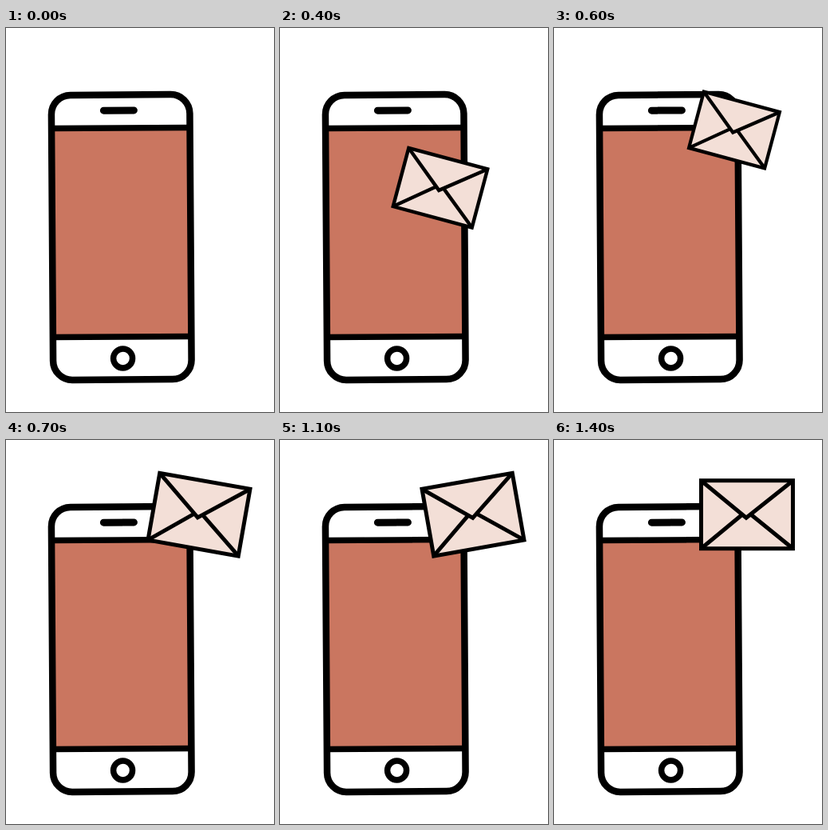
Animation, 336 px wide and 480 px high, one loop 1.5 s. Source, as an HTML page:

```html
<!DOCTYPE html>
<html lang="en">
<head>
<meta charset="utf-8">
<title>Phone message</title>
<style>
  html, body { margin: 0; width: 100%; height: 100%; overflow: hidden; background: #fff; }
  svg { display: block; width: 100vw; height: 100vh; }
</style>
</head>
<body>
<svg viewBox="0 0 336 480" fill="none" stroke="#000">
  <g transform="rotate(-.4 144.8 261.5)">
    <path d="M60 125H230V386H60Z" fill="#ca7660" stroke="none"/>
    <rect x="58" y="83.5" width="173.5" height="356" rx="24" stroke-width="8.5"/>
    <path d="M58 125H231.5M58 386H231.5" stroke-width="7.5"/>
    <path d="M123.5 103H161.5" stroke-width="9" stroke-linecap="round"/>
    <circle cx="145.5" cy="413" r="12" stroke-width="7.5"/>
  </g>
  <g id="envelope" stroke-width="5">
    <rect x="-57.5" y="-42.5" width="115" height="85" fill="#f3dfd7"/>
    <path d="M-57 -42L-1 4L57 -42M-57 42L-6 0M57 42L5 0"/>
  </g>
</svg>
<script>
  const STEP = 100, LOOP = 1500;
  const envelope = document.getElementById("envelope");

  // Flight out of the screen: x, y, scale
  const flight = [
    [143, 256, .3],
    [150.5, 240, .56],
    [176, 222, .74],
    [201, 199.7, .89],
    [215, 163, .87],
    [226, 127.5, .855]
  ];
  const wobble = [10, -10, 0];

  function pose(step) {
    if (step === 0) return [0, 0, 0, 0];
    if (step <= flight.length) return [...flight[step - 1], 15];
    const atRest = step === LOOP / STEP - 1;
    return [242, 93.2, 1, atRest ? 0 : wobble[(step - flight.length - 1) % 3]];
  }

  function draw(now) {
    const [x, y, scale, angle] = pose(Math.floor(now % LOOP / STEP));
    envelope.setAttribute("visibility", scale ? "visible" : "hidden");
    envelope.setAttribute("transform", `translate(${x} ${y}) rotate(${angle}) scale(${scale})`);
    requestAnimationFrame(draw);
  }
  draw(performance.now());
</script>
</body>
</html>
```
